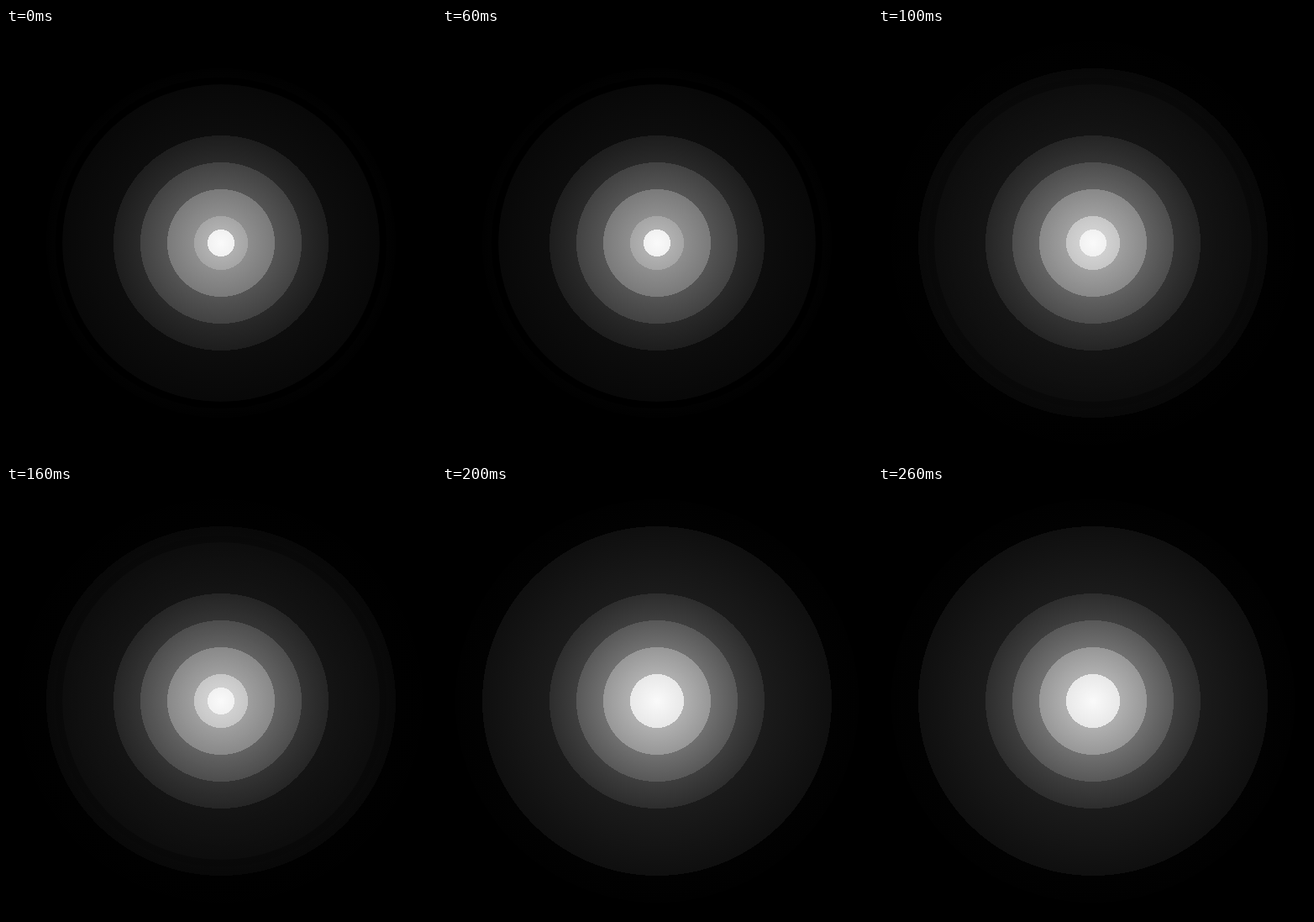
An HTML page that plays this animation: 512 px wide and 512 px high, repeating every 0.3 s.

```html
<!DOCTYPE html>
<html lang="en">
<head>
<meta charset="utf-8">
<title>Pulsing glow</title>
<style>
  html, body { margin: 0; width: 100%; height: 100%; overflow: hidden; background: #000; }
  svg { display: block; width: 100vw; height: 100vh; }
</style>
</head>
<body>
<svg viewBox="0 0 512 512">
  <defs id="defs"></defs>
  <circle id="dimGlow" cx="256" cy="256" r="256"/>
  <circle cx="256" cy="256" r="193" fill="none" stroke="#000" stroke-width="8"/>
  <circle id="brightGlow" cx="256" cy="256" r="256"/>
</svg>
<script>
  const SVG_NS = 'http://www.w3.org/2000/svg';
  const RADIUS = 256;
  const STEP_MS = 100;
  const STEPS = 3;
  const CORE_GREY = 250;
  const FADE_LENGTH = 450;

  function create(tag, attributes, parent) {
    const node = document.createElementNS(SVG_NS, tag);
    for (const [name, value] of Object.entries(attributes)) node.setAttribute(name, value);
    return parent.appendChild(node);
  }

  // Each band starts on a quadratic falloff and darkens slightly towards its outer edge.
  function paintGlow(circleId, { peak, reach, edges }) {
    const id = circleId + 'Fill';
    const gradient = create('radialGradient', {
      id, gradientUnits: 'userSpaceOnUse', cx: 256, cy: 256, r: RADIUS
    }, document.getElementById('defs'));
    const addStop = (radius, level) => {
      const grey = Math.round(level);
      create('stop', {
        offset: radius / RADIUS,
        'stop-color': `rgb(${grey},${grey},${grey})`
      }, gradient);
    };

    let inner = 0;
    for (const outer of edges) {
      const grey = inner ? peak * (1 - inner / reach) ** 2 : CORE_GREY;
      addStop(inner, grey);
      addStop(outer, grey * (1 - outer / FADE_LENGTH));
      inner = outer;
    }
    addStop(inner, 0);
    document.getElementById(circleId).setAttribute('fill', `url(#${id})`);
  }

  paintGlow('dimGlow', { peak: 216, reach: 170, edges: [16, 32, 64, 96, 128, 189, 208] });
  paintGlow('brightGlow', { peak: 255, reach: 190, edges: [32, 64, 96, 128, 208, 240] });

  const brightGlow = document.getElementById('brightGlow');
  const start = performance.now();

  function render() {
    const step = Math.floor((performance.now() - start) / STEP_MS) % STEPS;
    brightGlow.setAttribute('opacity', step / (STEPS - 1));
    requestAnimationFrame(render);
  }
  render();
</script>
</body>
</html>
```
